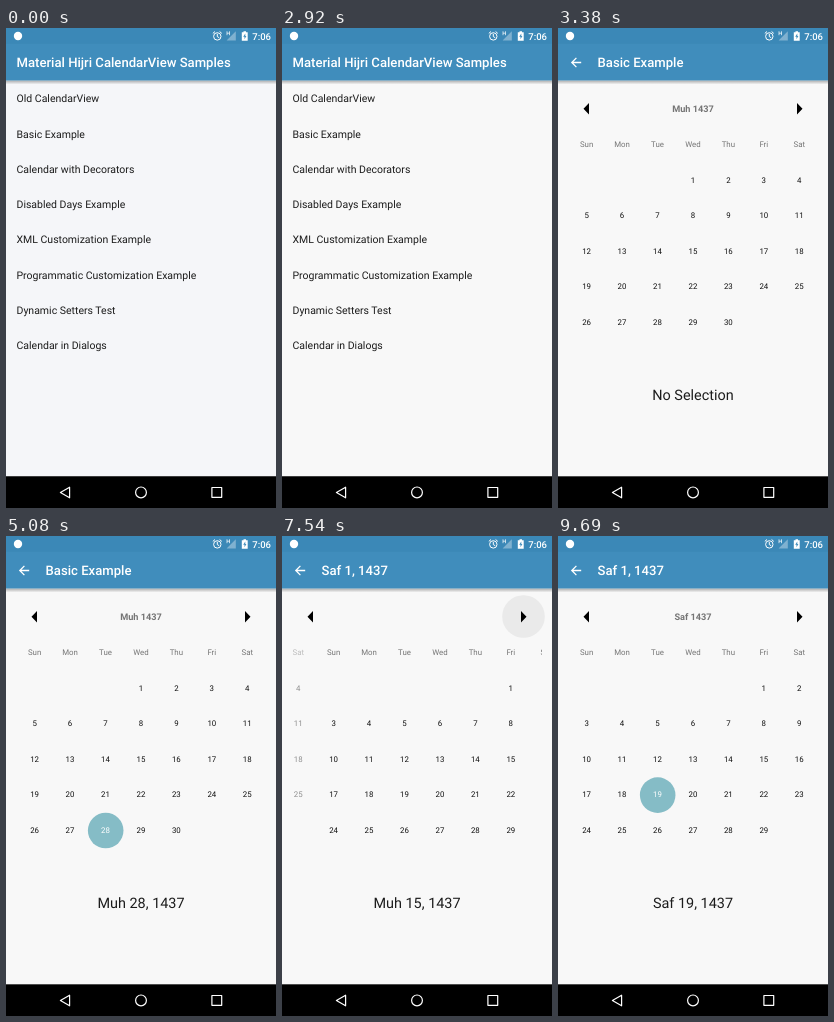
An HTML page for the animation above (9760 ms loop, 270 px wide and 480 px high).

```html
<!DOCTYPE html>
<html lang="en">
<head>
<meta charset="utf-8">
<title>Calendar samples</title>
<style>
  html, body { margin: 0; width: 100%; height: 100%; overflow: hidden; background: #000; }
  svg { display: block; width: 100%; height: 100%; font-family: Roboto, sans-serif; text-rendering: geometricPrecision; }
</style>
</head>
<body>
<svg id="stage" viewBox="0 0 270 480">
  <defs>
    <linearGradient id="shade" x2="0" y2="1">
      <stop offset="0" stop-opacity=".3"/>
      <stop offset="1" stop-opacity="0"/>
    </linearGradient>
    <clipPath id="pager"><rect x="11" y="100" width="249" height="220"/></clipPath>
  </defs>
</svg>
<script>
const LOOP = 9760, STEP = 75;
const CELL = 35.44, LEFT = 28.6, TOP = 152, PAGE_WIDTH = 248;
const OPEN = 2992, SWIPE = 7540;
const stage = document.getElementById('stage');
const clamp = v => Math.max(0, Math.min(1, v));

function add(parent, tag, attrs = {}, content) {
  const el = document.createElementNS('http://www.w3.org/2000/svg', tag);
  for (const key in attrs) el.setAttribute(key, attrs[key]);
  if (content !== undefined) el.textContent = content;
  parent.append(el);
  return el;
}
const group = (parent, attrs) => add(parent, 'g', attrs);
const rect = (parent, x, y, width, height, fill) => add(parent, 'rect', { x, y, width, height, fill });

// Text is placed by the middle of its capital letters.
function label(parent, text, x, middle, size, fill, weight = 400, anchor = 'middle') {
  return add(parent, 'text', {
    x, y: middle + size * .355, 'font-size': size, 'font-weight': weight, fill, 'text-anchor': anchor
  }, text);
}

function makeScreen(title, titleX) {
  const root = group(stage);
  const paper = rect(root, 0, 0, 270, 448.5, '#f8f8f8');
  rect(root, 0, 448.5, 270, 31.5, '#000');
  rect(root, 0, 52.5, 270, 4, 'url(#shade)');
  rect(root, 0, 0, 270, 52.5, '#408dbc');
  rect(root, 0, 0, 270, 15.75, '#3b88b7');
  return { root, paper, title: label(root, title, titleX, 34.6, 13.125, '#fff', 500, 'start') };
}

// List of samples
const list = makeScreen('Material Hijri CalendarView Samples', 10.5);
const rowPress = rect(list.root, 0, 88, 270, 35.3, '#000');
['Old CalendarView', 'Basic Example', 'Calendar with Decorators', 'Disabled Days Example',
  'XML Customization Example', 'Programmatic Customization Example', 'Dynamic Setters Test',
  'Calendar in Dialogs'
].forEach((name, i) => label(list.root, name, 10.5, 70.6 + i * 35.28, 10.5, '#1c1c1c', 400, 'start'));

// Calendar
const calendar = makeScreen('Basic Example', 39.5);
const calRoot = calendar.root;
add(calRoot, 'path', {
  d: 'M23.2 34.5H13.8M18.4 29.9L13.8 34.5L18.4 39.1', fill: 'none', stroke: '#fff', 'stroke-width': 1.3
});
const arrowPress = add(calRoot, 'circle', { cx: 241.5, cy: 80.5, r: 21.3, fill: '#eaeaea' });
add(calRoot, 'path', { d: 'M31 75V86.4L25.5 80.7ZM239 75V86.4L244.5 80.7Z', fill: '#000' });
const month = label(calRoot, '', 135, 81, 9.19, '#757575', 700);
const result = label(calRoot, '', 135, 367, 14.44, '#1c1c1c');
const pager = group(calRoot, { 'clip-path': 'url(#pager)' });

function cell(parent, number, day, fill) {
  const slot = day.firstColumn + number - 1;
  const x = LEFT + slot % 7 * CELL, y = TOP + Math.floor(slot / 7) * CELL;
  label(parent, number, x, y, 7.875, fill);
  return { x, y };
}

function makePage(name, firstColumn, length) {
  const page = { name, firstColumn, length, root: group(pager) };
  ['Sun', 'Mon', 'Tue', 'Wed', 'Thu', 'Fri', 'Sat'].forEach((weekday, i) =>
    label(page.root, weekday, LEFT + i * CELL, 116.5, 7.875, '#757575'));
  for (let n = 1; n <= length; n++) cell(page.root, n, page, '#111');
  return page;
}
const muh = makePage('Muh', 3, 30), saf = makePage('Saf', 5, 29);

function makeChoice(time, page, number, fadeSteps) {
  const mark = group(page.root);
  const disc = add(mark, 'circle', { r: 17.8, fill: '#85bcc6' });
  const { x, y } = cell(mark, number, page, '#fff');
  disc.setAttribute('cx', x + .2);
  disc.setAttribute('cy', y + .8);
  return { time, mark, fadeSteps, text: `${page.name} ${number}, 1437` };
}
const choices = [
  makeChoice(4920, muh, 28, 3), makeChoice(5920, muh, 15, 4),
  makeChoice(8690, saf, 13, 3), makeChoice(9380, saf, 19, 5)
];

// Status bar and navigation icons
const system = group(stage, { fill: '#fff' });
add(system, 'circle', { cx: 12, cy: 8, r: 4.2 });
add(system, 'path', {
  d: 'M211.3 5.8V8.6L213.2 9.7M206.8 5.4L209 3.5M213.6 3.5L215.8 5.4', fill: 'none', stroke: '#fff'
});
add(system, 'circle', { cx: 211.3, cy: 8.4, r: 3.7, fill: 'none', stroke: '#fff' });
add(system, 'path', { d: 'M229.8 3.2V12.4H220.6Z', opacity: .35 });
add(system, 'path', { d: 'M221 3.3V7.2M223.5 3.3V7.2M221 5.2H223.5', stroke: '#fff', 'stroke-width': .7 });
add(system, 'path', { d: 'M237.5 3.2H240V4.2H241.7V12.7H235.8V4.2H237.5Z' });
add(system, 'path', { d: 'M239.3 5.5L237.2 8.8H238.5V11.2L240.4 8H239.3Z', fill: '#408dbc' });
label(system, '7:06', 265, 8.2, 9.5, '#fff', 500, 'end');
const nav = group(system, { fill: 'none', stroke: '#fff', 'stroke-width': 1.2, 'stroke-linejoin': 'round' });
add(nav, 'path', { d: 'M63.6 459.2V469.8L54.4 464.5Z' });
add(nav, 'circle', { cx: 135, cy: 464.4, r: 5.4 });
add(nav, 'rect', { x: 205.9, y: 459.5, width: 9.8, height: 9.8 });

const steps = (t, start) => Math.floor((t - start) / STEP);
const fade = (el, value) => el.setAttribute('opacity', value);
const shift = (el, x, y) => el.setAttribute('transform', `translate(${x} ${y})`);

function draw(t) {
  list.paper.setAttribute('fill', t < 620 ? '#f5f6f9' : '#f8f8f8');
  const press = clamp((2230 + steps(t, 2230) * STEP - 2155) / 690);
  fade(rowPress, t < 2230 ? 0 : .09 * Math.sin(Math.PI * press));

  const opened = t < 3000 ? 0 : 3000 + steps(t, 3000) * STEP + 5 - OPEN;
  fade(calRoot, 1 - (1 - clamp(opened / 200)) ** 4);
  shift(calRoot, 0, 38.4 * (1 - clamp(opened / 350)) ** 5);

  const swiped = t >= SWIPE, turn = Math.min(2, steps(t, SWIPE));
  const offset = swiped ? [23, 5, 0][turn] : PAGE_WIDTH;
  shift(saf.root, offset, 0);
  shift(muh.root, offset - PAGE_WIDTH, 0);
  fade(muh.root, swiped ? .45 : 1);
  fade(arrowPress, swiped ? [1, .5, 0][turn] : 0);
  fade(month, swiped ? [0, .5, 1][turn] : 1);
  month.textContent = swiped ? 'Saf 1437' : 'Muh 1437';
  calendar.title.textContent = swiped ? 'Saf 1, 1437' : 'Basic Example';

  result.textContent = 'No Selection';
  choices.forEach((choice, i) => {
    const next = choices[i + 1];
    const shown = t < choice.time ? 0 : clamp((steps(t, choice.time) + 1) / 3);
    const gone = next && t >= next.time ? clamp((steps(t, next.time) + 1) / next.fadeSteps) : 0;
    fade(choice.mark, shown * (1 - gone));
    if (t >= choice.time) result.textContent = choice.text;
  });
}

const begin = performance.now();
function tick() {
  draw((performance.now() - begin) % LOOP);
  requestAnimationFrame(tick);
}
tick();
</script>
</body>
</html>
```
